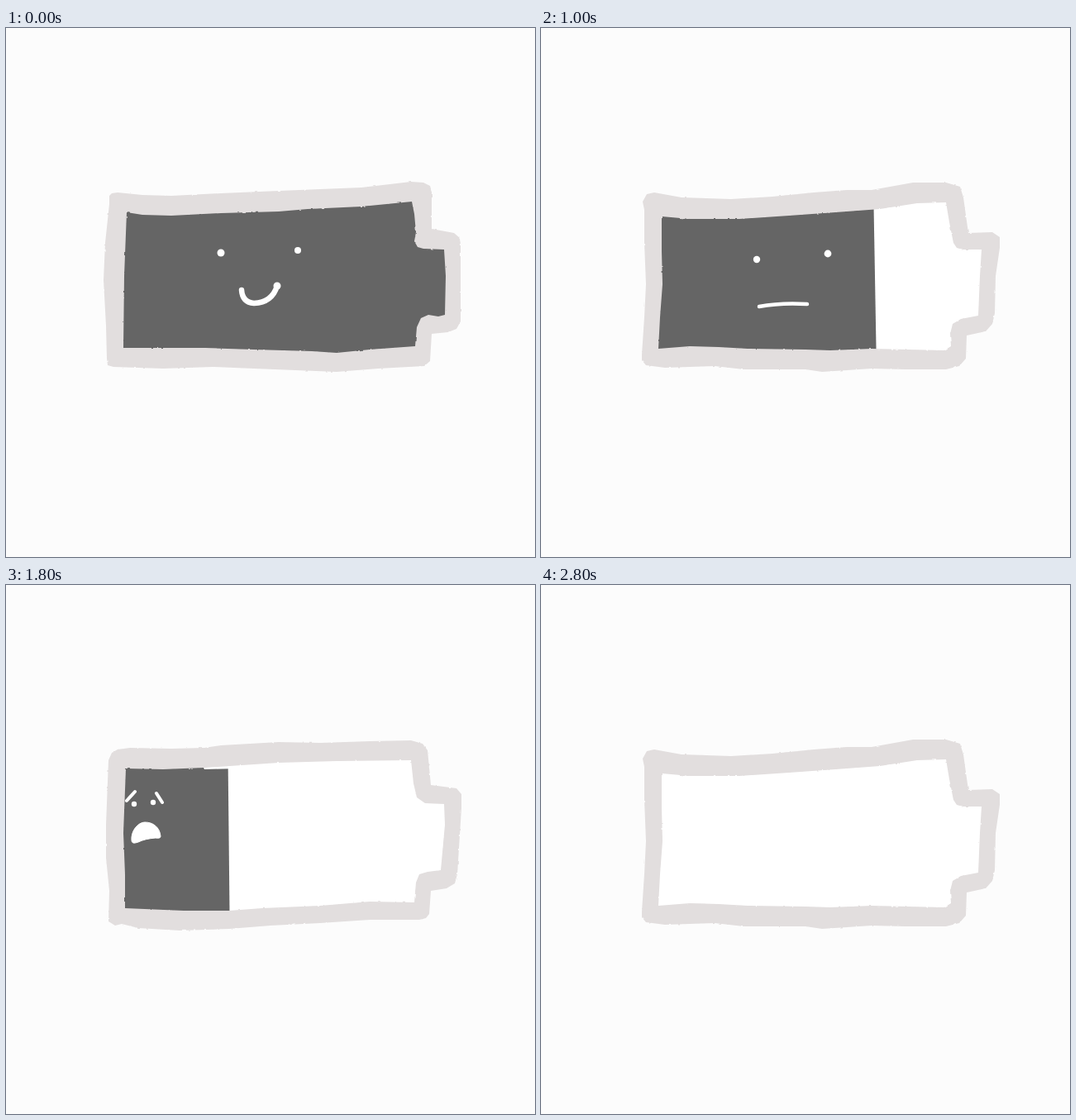
Animation, 640 px wide and 640 px high, one loop 2.9 s. Source, as an HTML page without scripts:

```html
<!DOCTYPE html>
<html lang="en">
<head>
<meta charset="utf-8">
<title>Draining battery</title>
<style>
  html, body { margin: 0; width: 100%; height: 100%; overflow: hidden; background: #fcfcfc; }
  svg { display: block; width: 100vw; height: 100vh; }
  .case path { fill: #e2dede; fill-rule: evenodd; }
  .case .gap { fill: #fff; }
  .face { fill: #fff; }
  .line { fill: none; stroke: #fff; stroke-width: 4.5; stroke-linecap: round; stroke-linejoin: round; }
  .thin { stroke-width: 4; }
  .bold { stroke-width: 6.5; }
  .mouth { stroke: #fff; stroke-width: 1; }
</style>
</head>
<body>
<svg viewBox="0 0 640 640">
  <defs>
    <path id="inside" d="M134 212L200 216 260 211 330 207 400 204 460 199 502 200 506 255 541 258 540 355 505 361 504 397 400 402 300 402 200 398 133 399Z"/>
    <clipPath id="within"><use href="#inside"/></clipPath>
    <filter id="rough" filterUnits="userSpaceOnUse" x="100" y="170" width="470" height="260" color-interpolation-filters="sRGB">
      <feTurbulence type="fractalNoise" baseFrequency=".15" numOctaves="2" seed="4"/>
      <feDisplacementMap in="SourceGraphic" scale="2.2" xChannelSelector="R" yChannelSelector="G"/>
    </filter>
  </defs>

  <use href="#inside" fill="#fff"/>

  <!-- Charge: right edge slides and tilts in 100 ms steps -->
  <g clip-path="url(#within)">
    <g transform="translate(0 300)">
      <g>
        <animateTransform attributeName="transform" type="translate" calcMode="discrete" dur="2.9s" repeatCount="indefinite"
          values="560;560;540;528;514;495;472;449;436;420;404;388;372;357;340;322;305;287;269.500;252;234;216;199;181;163;150;100;100;100"/>
        <path d="M-500-150H0V150H-500Z" fill="#656565">
          <animateTransform attributeName="transform" type="skewX" calcMode="discrete" dur="2.9s" repeatCount="indefinite"
            values="0;0;0;0;-3;-3;-3;-2.9;-1;0;1;2;3;3.6;3;2;2;1;.6;0;0;0;0;0;0;0;0;0;0"/>
          <animate attributeName="fill" calcMode="discrete" dur="2.9s" repeatCount="indefinite"
            keyTimes="0;.6551;.6896;.7241;.7586;.7931;.8275;.862"
            values="#656565;#6c6c6c;#757575;#808080;#8c8c8c;#a8a8a8;#c8c8c8;#e4e4e4"/>
        </path>
      </g>
    </g>
  </g>

  <!-- Broad smile -->
  <g class="face">
    <animate attributeName="opacity" calcMode="discrete" dur="2.9s" repeatCount="indefinite" keyTimes="0;.1034" values="1;0"/>
    <circle cx="260" cy="272" r="4.5"/>
    <circle cx="353" cy="269" r="4"/>
    <path class="line bold" d="M285 317Q286 332 300 333 322 332 328 312"/>
    <circle cx="328" cy="312" r="4.5"/>
  </g>

  <!-- Pointed smile -->
  <g class="face" opacity="0">
    <animate attributeName="opacity" calcMode="discrete" dur="2.9s" repeatCount="indefinite" keyTimes="0;.1034;.2068" values="0;1;0"/>
    <circle cx="261.5" cy="274" r="3.5"/>
    <circle cx="353" cy="269.5" r="3.2"/>
    <path class="line bold" d="M284 316Q290 330 299 335.500 316 327 323 306"/>
  </g>

  <!-- Faint smile -->
  <g class="face" opacity="0">
    <animate attributeName="opacity" calcMode="discrete" dur="2.9s" repeatCount="indefinite" keyTimes="0;.2068;.3103" values="0;1;0"/>
    <circle cx="263.5" cy="276" r="3.5"/>
    <circle cx="354" cy="271" r="4.5"/>
    <path class="line" d="M272 327Q288 336 310 334L352 324"/>
  </g>

  <!-- Uneasy -->
  <g class="face" opacity="0">
    <animate attributeName="opacity" calcMode="discrete" dur="2.9s" repeatCount="indefinite" keyTimes="0;.3103;.4137" values="0;1;0"/>
    <circle cx="261" cy="280" r="4.2"/>
    <circle cx="347" cy="273" r="4.4"/>
    <path class="line" d="M264 337Q290 332 322 334"/>
  </g>

  <!-- Worried, squeezed towards the left -->
  <g class="face" opacity="0">
    <animate attributeName="opacity" calcMode="discrete" dur="2.9s" repeatCount="indefinite" keyTimes="0;.4137;.6206" values="0;1;0"/>
    <g>
      <animateTransform attributeName="transform" type="translate" calcMode="discrete" dur="2.9s" repeatCount="indefinite"
        keyTimes="0;.4827;.5172;.5517;.5862" values="0 0;-21 -4;-42 -8;-62 -11;-83 -15"/>
      <path class="line" d="M234 272Q246 269 252 260"/>
      <circle cx="259" cy="284" r="5"/>
      <path class="line thin" d="M255 301Q260 297 265 297"/>
    </g>
    <g>
      <animateTransform attributeName="transform" type="translate" calcMode="discrete" dur="2.9s" repeatCount="indefinite"
        keyTimes="0;.4827;.5172;.5517;.5862" values="0 0;-32 -3;-64 -5;-96 -8;-128 -10"/>
      <path class="line" d="M337 250Q344 257 350 258"/>
      <circle cx="339" cy="276" r="4.5"/>
      <path class="line thin" d="M333 292q6-1 10 1"/>
    </g>
    <path class="mouth" d="M261 351C260 335 270 321 281 321 293 322 298 338 298 350Q297 353 290 352 275 351 268 354 261 354 261 351Z">
      <animateTransform attributeName="transform" type="translate" calcMode="discrete" dur="2.9s" repeatCount="indefinite"
        keyTimes="0;.4827;.5172;.5517;.5862" values="0 0;-22 -5;-44 -10;-66 -15;-88 -20"/>
    </path>
  </g>

  <!-- Cornered -->
  <g class="face" opacity="0">
    <animate attributeName="opacity" calcMode="discrete" dur="2.9s" repeatCount="indefinite" keyTimes="0;.6206;.7241" values="0;1;0"/>
    <path class="line thin" d="M146 261L156 250M182 252L189 263"/>
    <circle cx="155" cy="265" r="3.2"/>
    <circle cx="178" cy="263" r="3.2"/>
    <path class="mouth" d="M152 309C151 297 160 287 168 287 178 287 186 293 187 304Q187 307 181 306 168 307 160 311 152 314 152 309Z"/>
  </g>

  <!-- Tumbled -->
  <g class="face" opacity="0">
    <animate attributeName="opacity" calcMode="discrete" dur="2.9s" repeatCount="indefinite" keyTimes="0;.7241;.862" values="0;1;0"/>
    <path class="line thin" d="M150 261L154 250M168 236Q174 234 175 238M184 248Q187 246 191 245M188 255L195 251"/>
    <circle cx="156" cy="260" r="3"/>
    <circle cx="174" cy="242" r="3.5"/>
    <circle cx="194" cy="262" r="2"/>
    <path class="mouth" d="M164 272C164 264 172 259 178 262Q185 267 186 271 182 278 173 285 166 284 164 272Z"/>
    <path d="M164 370h1.5v3h1.5v1.500h-3z" fill="#555"/>
  </g>

  <!-- Case: three drawings that take turns -->
  <g class="case" filter="url(#rough)">
    <path d="M125 203L128 200 135 199 165 202 200 203 260 200 330 197 430 193 490 186 505 187 513 191 515 198 515 243 542 248 549 254 550 262 550 355 545 364 535 368 515 370 513 403 506 409 450 412 400 416 300 412 250 410 190 412 130 410 123 408 122 400 121 360 118 305 120 260 125 213Z
      M146 223L165 226 200 227 260 224 330 222 365 219 430 216 491 210 494 225 496 247 494 258 498 265 505 267 530 268 532 300 531 347 523 349 511 347 502 351 497 362 495 385 440 389 400 393 370 391 300 389 240 387 190 387 142 387 143 300Z">
      <animate attributeName="opacity" calcMode="discrete" dur="2.9s" repeatCount="indefinite"
        values="1;0;0;1;0;0;0;0;1;0;0;1;0;0;1;0;0;1;0;0;1;0;0;1;0;0;1;0;0"/>
    </path>
    <g opacity="0">
      <animate attributeName="opacity" calcMode="discrete" dur="2.9s" repeatCount="indefinite"
        values="0;1;0;0;1;0;1;0;0;1;0;0;1;0;0;1;0;0;1;0;0;1;0;0;1;0;0;1;0"/>
      <path class="gap" d="M238 219L330 213 390 212 380 214.500 330 218 280 222 240 223Z"/>
      <path d="M124 212L128 203 135 199 150 197 200 198 240 197 260 194 330 190 380 191 440 189 490 188 504 192 510 200 514 242 545 246 551 253 551 270 546 350 543 361 533 367 514 370 512 398 508 403 500 405 440 405 380 409 320 412 270 416 210 418 160 415 140 410 132 412 124 407 125 370 121 330 121 290Z
        M145 222L190 223 240 221 330 215 400 213 490 212 493 240 497 257 507 264 530 265 531 290 526 345 510 347 500 350 496 360 494 384 440 383 380 388 310 391 270 394 215 394 144 391 144 350 142 300Z"/>
    </g>
    <path opacity="0" d="M123 210L128 201 137 199 170 205 230 207 280 204 330 199 370 196 400 196 450 187 490 187 507 192 511 205 517 248 546 247 555 253 555 266 550 300 549 345 546 358 538 367 515 372 514 400 506 409 490 413 440 413 400 412 340 416 320 413 245 413 210 409 150 411 127 408 122 402 122 395 125 350 127 310 125 260 125 220Z
      M146 228L180 231 240 231 300 227 370 222 410 219 455 212 490 211 494 235 499 260 503 266 510 268 533 268 531 300 529 348 508 352 498 358 495 370 496 385 488 390 400 388 350 390 320 389 250 388 215 386 180 385 142 388 144 350 147 310 146 270Z">
      <animate attributeName="opacity" calcMode="discrete" dur="2.9s" repeatCount="indefinite"
        values="0;0;1;0;0;1;0;1;0;0;1;0;0;1;0;0;1;0;0;1;0;0;1;0;0;1;0;0;1"/>
    </path>
  </g>
</svg>
</body>
</html>
```
